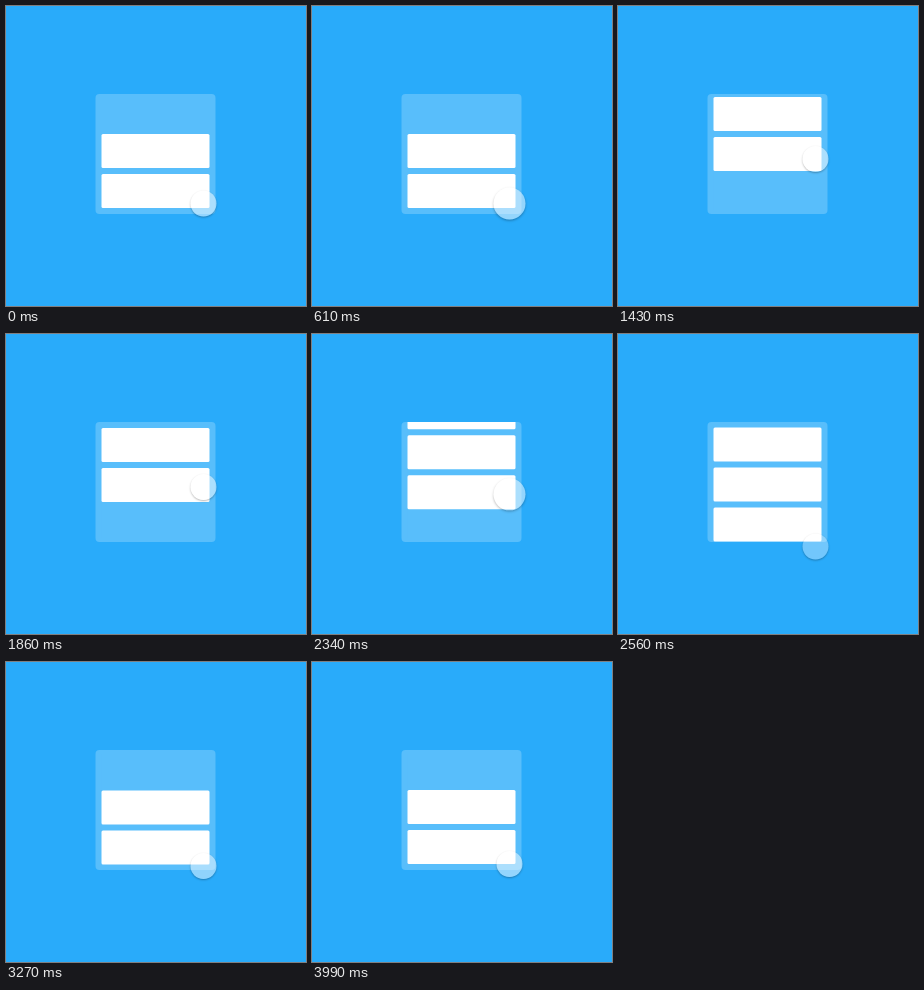
These frames come from a looping animation (300 by 300 pixels, 4.26 s). An HTML page:

```html
<!DOCTYPE html>
<html lang="en">
<head>
<meta charset="utf-8">
<title>Scrolling list</title>
<style>
  html, body { margin: 0; width: 100%; height: 100%; overflow: hidden; background: #29abfa; }
  svg { position: absolute; left: 0; top: 0; width: 300px; height: 300px; }
  #touch {
    position: absolute; left: 0; top: 0; width: 26px; height: 26px;
    margin: -13px 0 0 -13px; border-radius: 50%;
    box-shadow: 0 1px 2px rgba(0, 0, 0, .28);
  }
</style>
</head>
<body>
<svg viewBox="0 0 300 300">
  <clipPath id="panel"><rect x="89.5" y="88" width="120" height="120" rx="4"/></clipPath>
  <rect x="89.5" y="88" width="120" height="120" rx="4" fill="#fff" fill-opacity=".22"/>
  <g clip-path="url(#panel)"><g id="list" fill="#fff"></g></g>
</svg>
<div id="touch"></div>
<script>
const LOOP = 4260, CARDS = 5, PITCH = 40;
const list = document.getElementById('list');
const touch = document.getElementById('touch');

for (let i = 0; i < CARDS; i++) {
  const card = document.createElementNS('http://www.w3.org/2000/svg', 'rect');
  const attrs = { x: 95.5, y: i * PITCH, width: 108, height: 34, rx: 1.5 };
  for (const key in attrs) card.setAttribute(key, attrs[key]);
  list.append(card);
}

const easeIn = p => u => u ** p;
const easeOut = p => u => 1 - (1 - u) ** p;
const inOut = u => (1 - Math.cos(Math.PI * u)) / 2;
const step = u => u < 1 ? 0 : 1;

// Segments are [start, end, target value, easing].
function track(t, value, segments) {
  for (const [start, end, target, ease] of segments) {
    if (t < start) break;
    value += (target - value) * ease(Math.min(1, (t - start) / (end - start)));
  }
  return value;
}

const firstDrag = easeIn(2.8), secondDrag = easeIn(2.33);

// Drag, fling past the edge, then spring back.
const scroll = [
  [845, 1048, 83.5, firstDrag],
  [1048, 1390, -29, easeOut(2)],
  [1425, 1870, -26, inOut],
  [2280, 2430, 33.5, secondDrag],
  [2430, 2830, 132, easeOut(2.36)],
  [2835, 3390, 128, inOut]
];
const touchY = [
  [845, 1048, 153, firstDrag],
  [2280, 2430, 212.5, secondDrag],
  [2835, 3390, 203, inOut],
  [3980, 3990, 202, step]
];
const radius = [
  [430, 610, 16, inOut],
  [1040, 1200, 13, inOut],
  [1930, 2120, 16, inOut],
  [2420, 2555, 13, inOut]
];
const alpha = [
  [2340, 2430, .34, inOut],
  [2835, 3390, .5, inOut]
];

function render(t) {
  list.setAttribute('transform', `translate(0 ${track(t, 128, scroll)})`);
  const y = track(t, 197.5, touchY), scale = track(t, 13, radius) / 13;
  touch.style.transform = `translate(197.5px, ${y}px) scale(${scale})`;
  touch.style.background = `rgba(255, 255, 255, ${track(t, .5, alpha)})`;
}

const began = performance.now();
function tick() {
  render((performance.now() - began) % LOOP);
  requestAnimationFrame(tick);
}
render(0);
requestAnimationFrame(tick);
</script>
</body>
</html>
```
